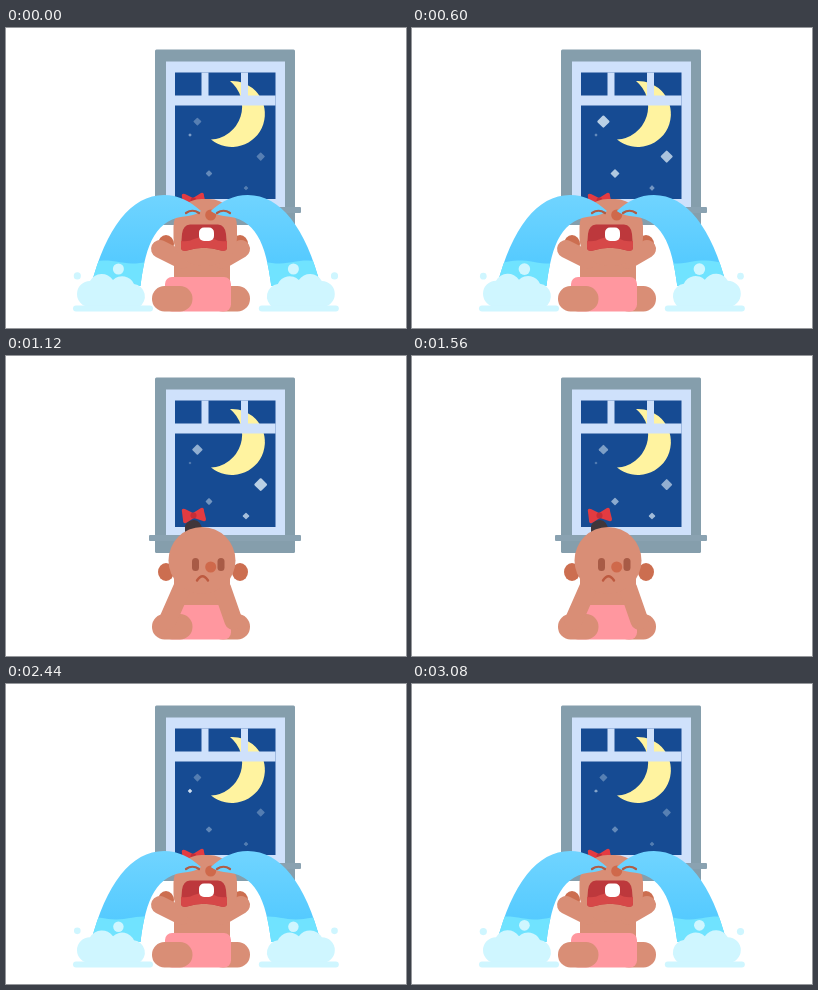
These frames come from a looping animation (400 by 300 pixels, 3120 ms). An HTML page:

```html
<!DOCTYPE html>
<html lang="en">
<head>
<meta charset="utf-8">
<title>Crying baby at night</title>
<style>
  html, body { margin: 0; width: 100%; height: 100%; overflow: hidden; background: #fff; }
  svg { display: block; width: 100vw; height: 100vh; }
  .skin { fill: #d98e76; }
  .limb { stroke: #d98e76; stroke-width: 18; }
  .line { fill: none; stroke-linecap: round; }
</style>
</head>
<body>
<svg viewBox="0 0 400 300">
  <defs>
    <linearGradient id="water" x1="0" x2="0" y1="0" y2="1">
      <stop offset="0" stop-color="#70d4ff"/>
      <stop offset="1" stop-color="#4cc7ff"/>
    </linearGradient>
    <clipPath id="jet">
      <path id="jetShape" d="M195 183C184 173 172 167 158 167C125 167 100 200 85 258H134.500C140 215 150 190 182 188Q190 187 195 183Z"/>
    </clipPath>
    <mask id="flow" maskUnits="userSpaceOnUse" x="0" y="100" width="230" height="200">
      <path id="flowLine" d="M206 196C170 162 118 172 104 290" pathLength="100" fill="none" stroke="#fff" stroke-width="84"/>
    </mask>
  </defs>

  <rect width="400" height="300" fill="#fff"/>
  <g id="window">
    <rect x="149" y="21.500" width="140" height="175.500" rx="1.500" fill="#859eac"/>
    <rect x="160" y="33.500" width="119" height="146.500" fill="#cfe1fb"/>
    <rect x="169" y="44.500" width="100.500" height="126.500" fill="#164b93"/>
    <path d="M224 53A33 33 0 1 1 205 111.500A33 33 0 0 0 224 53Z" fill="#fff3a0"/>
    <path d="M169 67.500H269.500V77.500H169ZM195.500 44.500H202.500V68H195.500ZM235 44.500H242V68H235Z" fill="#cfe1fb"/>
    <g id="stars" fill="#e4f1fa"></g>
    <rect x="143" y="179" width="152" height="6" rx="1" fill="#8aa2b1"/>
  </g>

  <g id="baby">
    <g fill="#cc6e50">
      <ellipse cx="160" cy="216" rx="8" ry="9"/>
      <ellipse cx="234" cy="216" rx="8" ry="9"/>
    </g>
    <rect class="skin" x="204" y="258" width="40" height="25.500" rx="12.500"/>
    <rect class="skin" x="168" y="222" width="56" height="50"/>
    <rect x="159" y="249" width="66" height="34.500" rx="7" fill="#ff979f"/>
    <rect class="skin" x="146" y="258" width="40.500" height="25.500" rx="12.500"/>
    <path id="armL" class="limb line"/>
    <path id="armR" class="limb line"/>
    <g id="bow">
      <path d="M179 176V170Q181 164 188 164Q195 164 197 176Z" fill="#40363a"/>
      <path d="M176 156Q175 152 179 153L187 157L195 152Q198 151 198 155L200 163Q200 166 197 165L188 162L180 167Q177 168 177 164Z" fill="#e33b41"/>
      <circle cx="187.500" cy="159.500" r="3" fill="#c52d37"/>
    </g>
    <rect id="head" class="skin" y="171" height="67"/>
    <g id="calm">
      <rect x="186" y="202" width="7" height="13" rx="3.500" fill="#a85b46"/>
      <rect x="211.500" y="202" width="7" height="13" rx="3.500" fill="#a85b46"/>
      <path class="line" d="M191 224.500Q196.500 216 202 224.500" stroke="#bd5a40" stroke-width="2.400"/>
    </g>
    <g id="mouth">
      <path d="M184 196.500H212Q219 197 220 206L221 219Q221 224 215 222.500Q198 217 181 222.500Q175 224 175 219L176 206Q177 197 184 196.500Z" fill="#bd383c"/>
      <path d="M175 213Q183 214 188 211Q198 207 208 211Q213 214 221 213V219Q221 224 215 222.500Q198 217 181 222.500Q175 224 175 219Z" fill="#d64848"/>
      <rect x="193" y="199.500" width="15" height="13.500" rx="5" fill="#fff"/>
    </g>
    <circle id="nose" cx="204.700" r="5.500" fill="#cf694b"/>
  </g>

  <g id="tears">
    <g id="side">
      <g mask="url(#flow)">
        <use href="#jetShape" fill="url(#water)"/>
        <path id="wave" clip-path="url(#jet)" fill="#70e3ff"/>
      </g>
      <g id="splash" fill="#cff6ff">
        <path d="M84 279A12.500 12.500 0 0 1 84 253A13.500 13.500 0 0 1 107 252A13 13 0 0 1 128 256A12.500 12.500 0 0 1 133 279V281H80Z"/>
        <rect x="67" y="277.500" width="80" height="6" rx="3"/>
        <g id="drops"></g>
      </g>
    </g>
    <use href="#side" transform="translate(399.800 0) scale(-1 1)"/>
  </g>
  <path id="shut" class="line" d="M180 185Q186.500 180.500 193 185M211 185Q217.500 180.500 224 185" stroke="#b05c45" stroke-width="2.200"/>
</svg>
<script>
const LOOP = 3120;
const $ = id => document.getElementById(id);
const set = (el, attrs) => { for (const k in attrs) el.setAttribute(k, attrs[k]); };
const mix = (a, b, k) => a + (b - a) * k;
const ramp = (t, a, b) => Math.min(1, Math.max(0, (t - a) / (b - a)));
const ease = k => k * k * (3 - 2 * k);
const add = (parent, tag) =>
  parent.appendChild(document.createElementNS('http://www.w3.org/2000/svg', tag));

// x, y, radius, then brightness at each key time
const keys = [0, 600, 1120, 2040, 2440, 2760, LOOP];
const stars = [
  [191.4, 93.6, 6.5, .32, .8, .6, .4, .3, .3, .32],
  [184, 107, 2.3, .5, .4, .3, .35, .9, .8, .5],
  [203, 145.5, 4.8, .38, .75, .45, .72, .36, .36, .38],
  [254.7, 128.6, 6.8, .32, .72, .8, .4, .3, .3, .32],
  [240, 160, 3.8, .3, .45, .7, .65, .3, .3, .3]
].map(([x, y, r, ...glow]) => ({ x, y, r, glow, el: add($('stars'), 'rect') }));

const drops = [[112.4, 242, 5.5], [71.3, 247.500, 3.3]]
  .map(([x, y, r]) => ({ x, y, r, el: add($('drops'), 'circle') }));

function twinkle(t) {
  const i = Math.max(1, keys.findIndex(k => k >= t));
  const k = ramp(t, keys[i - 1], keys[i]);
  for (const s of stars) {
    const glow = mix(s.glow[i - 1], s.glow[i], k);
    const size = s.r * 1.42 * mix(.4, 1, Math.min(1, glow / .8));
    set(s.el, {
      x: -size / 2, y: -size / 2, width: size, height: size, rx: size * .12,
      opacity: glow, transform: `translate(${s.x} ${s.y}) rotate(45)`
    });
  }
}

function pose(t) {
  const cry = t < 1600 ? 1 - ease(ramp(t, 840, 1110)) : ease(ramp(t, 2080, 2260));
  const handX = mix(33, 40.5, cry), handY = mix(265, 221, cry);
  set($('armL'), { d: `M176 232L${194.5 - handX} ${handY}` });
  set($('armR'), { d: `M216 232L${194.5 + handX} ${handY}` });
  set($('head'), {
    x: mix(162.5, 167.5, cry), width: mix(67, 63.5, cry), rx: mix(33.5, 28, cry)
  });
  set($('bow'), { transform: `translate(0 ${13 * cry})` });
  set($('calm'), { opacity: 1 - cry, transform: `translate(0 ${-20 * cry})` });
  set($('shut'), { opacity: cry });
  set($('mouth'), {
    opacity: ramp(cry, 0, .2),
    transform: `translate(198 ${mix(222, 210, cry)}) scale(${cry}) translate(-198 -210)`
  });
  set($('nose'), { cy: mix(211, 187, cry) });
}

function weep(t) {
  const ending = t < 1600;
  const tail = ending ? 100 * ramp(t, 740, 1000) : 0;
  const front = ending ? 100 : 100 * ramp(t, 2120, 2330);
  set($('flowLine'), { 'stroke-dasharray': `0 ${tail} ${front - tail} 300` });
  $('tears').style.display = front > tail || (ending && t < 1110) ? '' : 'none';

  const phase = t / LOOP * 12 * Math.PI;
  let d = 'M70 270';
  for (let x = 70; x <= 150; x += 4) d += `L${x} ${234 + 1.5 * Math.sin(x / 9 - phase)}`;
  set($('wave'), { d: d + 'V270Z' });

  const width = ending
    ? (1 + .12 * ramp(t, 800, 960)) * (1 - ease(ramp(t, 960, 1100)))
    : ease(ramp(t, 2280, 2410));
  const height = ending ? 1 - ease(ramp(t, 880, 1100)) : width;
  set($('splash'), {
    transform: `translate(107 283.5) scale(${width} ${height * (1 + .01 * Math.sin(phase))}) translate(-107 -283.5)`
  });
  drops.forEach((p, i) => set(p.el, {
    cx: p.x, cy: p.y - Math.cos(phase + i * 2), r: p.r + .3 * Math.sin(phase + i * 2)
  }));
}

function frame(now) {
  const t = now % LOOP;
  twinkle(t);
  pose(t);
  weep(t);
  requestAnimationFrame(frame);
}
frame(0);
</script>
</body>
</html>
```
